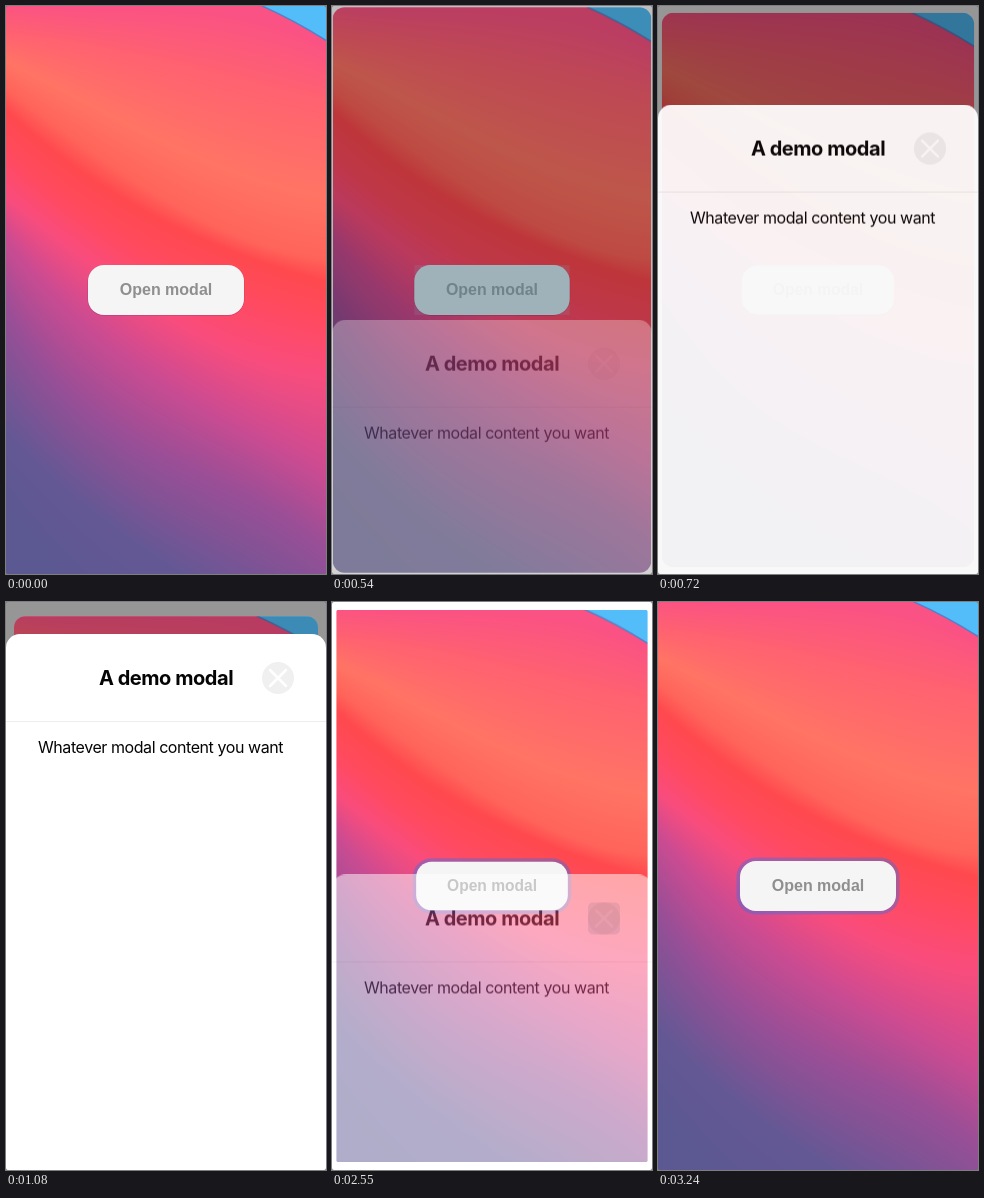
Write an HTML page with a canvas that moves like this. It is 320 px wide and 568 px high and loops after 3.54 s.

```html
<!DOCTYPE html>
<html lang="en">
<head>
<meta charset="utf-8">
<title>Modal demo</title>
<style>
  html, body { margin: 0; width: 100%; height: 100%; overflow: hidden; background: #777; }
  canvas { display: block; width: 320px; height: 568px; border-radius: 2px; }
</style>
</head>
<body>
<canvas id="stage"></canvas>
<script>
const W = 320, H = 568, LOOP = 3540, STEP = 30;
const dpr = window.devicePixelRatio || 1;

function sizeCanvas(canvas, w, h) {
  canvas.width = Math.round(w * dpr);
  canvas.height = Math.round(h * dpr);
  const c = canvas.getContext('2d');
  c.scale(dpr, dpr);
  return c;
}

const clamp = v => Math.min(1, Math.max(0, v));
const span = (t, from, to) => clamp((t - from) / (to - from));
const smooth = x => x * x * (3 - 2 * x);
const inOutCubic = x => x < 0.5 ? 4 * x ** 3 : 1 - 4 * (1 - x) ** 3;
const mix = (a, b, k) => a + (b - a) * k;

function roundRect(c, x, y, w, h, r) {
  c.beginPath();
  c.roundRect(x, y, w, h, r);
}

// Colour bands: heights at four evenly spaced columns, then the colour.
const BANDS = [
  [[-5, 0, 5, 38], [250, 82, 132]],
  [[28, 45, 70, 95], [255, 98, 112]],
  [[55, 110, 160, 190], [255, 116, 100]],
  [[82, 160, 222, 252], [255, 100, 90]],
  [[104, 186, 240, 275], [255, 73, 78]],
  [[150, 232, 285, 318], [255, 74, 97]],
  [[188, 270, 335, 365], [250, 76, 124]],
  [[228, 335, 405, 465], [205, 75, 145]],
  [[300, 418, 475, 540], [155, 78, 150]],
  [[425, 520, 590, 660], [100, 88, 148]],
  [[500, 620, 700, 760], [92, 88, 145]]
];

// Cubic through four heights.
function curveAt([a, b, c, d], x) {
  const u = x / W * 3;
  return -a * (u - 1) * (u - 2) * (u - 3) / 6
    + b * u * (u - 2) * (u - 3) / 2
    - c * u * (u - 1) * (u - 3) / 2
    + d * u * (u - 1) * (u - 2) / 6;
}

function makeWallpaper() {
  const canvas = document.createElement('canvas');
  canvas.width = W;
  canvas.height = H;
  const c = canvas.getContext('2d');
  const img = c.createImageData(W, H);
  for (let x = 0; x < W; x++) {
    const ys = BANDS.map(b => curveAt(b[0], x));
    let i = 0;
    for (let y = 0; y < H; y++) {
      while (i < BANDS.length - 2 && y > ys[i + 1]) i++;
      const k = span(y, ys[i], ys[i + 1]);
      const p = (y * W + x) * 4;
      for (let n = 0; n < 3; n++) {
        img.data[p + n] = mix(BANDS[i][1][n], BANDS[i + 1][1][n], k);
      }
      img.data[p + 3] = 255;
    }
  }
  c.putImageData(img, 0, 0);

  c.beginPath();
  c.moveTo(254, -1);
  c.quadraticCurveTo(288, 14, 321, 35);
  c.lineTo(321, -1);
  c.closePath();
  c.fillStyle = '#52bdf8';
  c.fill();
  c.beginPath();
  c.moveTo(254, -1);
  c.quadraticCurveTo(288, 14, 321, 35);
  c.strokeStyle = 'rgba(60,130,205,.8)';
  c.lineWidth = 1.5;
  c.stroke();
  return canvas;
}

function makeModal() {
  const canvas = document.createElement('canvas');
  const c = sizeCanvas(canvas, W, H);
  roundRect(c, 0, 0, W, H + 20, 14);
  c.fillStyle = '#fff';
  c.fill();

  c.fillStyle = '#ededed';
  c.fillRect(0, 87, W, 1);

  c.fillStyle = '#050505';
  c.textBaseline = 'alphabetic';
  c.font = '700 20px Inter, sans-serif';
  c.letterSpacing = '-0.45px';
  c.textAlign = 'center';
  c.fillText('A demo modal', 160, 51);
  c.font = '400 16px Inter, sans-serif';
  c.letterSpacing = '-0.43px';
  c.textAlign = 'left';
  c.fillText('Whatever modal content you want', 32, 119);

  c.beginPath();
  c.arc(272, 44, 16, 0, Math.PI * 2);
  c.fillStyle = '#f0f0f0';
  c.fill();
  c.beginPath();
  c.moveTo(264, 36);
  c.lineTo(280, 52);
  c.moveTo(280, 36);
  c.lineTo(264, 52);
  c.strokeStyle = '#fff';
  c.lineWidth = 2.5;
  c.lineCap = 'round';
  c.stroke();
  return canvas;
}

const ctx = sizeCanvas(document.getElementById('stage'), W, H);
const wallpaper = makeWallpaper();
let modal = makeModal();

function pose(t) {
  if (t < 2333) {
    return {
      rise: inOutCubic(span(t, 85, 1011)),
      alpha: smooth(span(t, 400, 780)),
      shrink: smooth(span(t, 430, 1030)),
      shade: 0.41 * smooth(span(t, 415, 630)),
      radius: 12 * smooth(span(t, 60, 470)),
      tap: span(t, 0, 90) * (1 - span(t, 500, 600)),
      ring: false,
      closeTap: 0
    };
  }
  const left = 1 - inOutCubic(span(t, 2333, 2783));
  return {
    rise: left,
    alpha: left * 0.85 + left * left * 0.15,
    shrink: left,
    shade: 0.41 * (1 - smooth(span(t, 2340, 2490))),
    radius: 12 * left ** 3,
    tap: 0,
    ring: true,
    closeTap: span(t, 2340, 2400) * 0.3
  };
}

function drawButton(s) {
  if (s.ring) {
    roundRect(ctx, 78.5, 255.5, 163, 57, 19.5);
    ctx.fillStyle = 'rgba(70,110,220,.45)';
    ctx.fill();
  } else {
    roundRect(ctx, 81.5, 259, 157, 50.8, 16.5);
    ctx.fillStyle = 'rgba(110,40,90,.3)';
    ctx.fill();
  }
  roundRect(ctx, 82, 259, 156, 50, 16);
  ctx.fillStyle = '#f5f5f5';
  ctx.fill();
  ctx.fillStyle = '#8f8f8f';
  ctx.font = '700 16px "Liberation Sans", Arial, sans-serif';
  ctx.textAlign = 'center';
  ctx.fillText('Open modal', 160, 289);
  if (s.tap > 0) {
    ctx.fillStyle = `rgba(160,225,255,${0.25 * s.tap})`;
    ctx.fillRect(82, 259, 156, 50);
    roundRect(ctx, 82, 259, 156, 50, 16);
    ctx.fillStyle = `rgba(160,225,255,${0.45 * s.tap})`;
    ctx.fill();
  }
}

function drawPage(s) {
  const k = 1 - 0.05 * s.shrink;
  ctx.save();
  ctx.translate(W / 2, H / 2);
  ctx.scale(k, k);
  ctx.translate(-W / 2, -H / 2);
  roundRect(ctx, 0, 0, W, H, s.radius);
  ctx.clip();
  ctx.drawImage(wallpaper, 0, 0, W, H);
  drawButton(s);
  // The shade softens a little as the page settles back.
  ctx.fillStyle = `rgba(0,0,0,${s.shade * (1 - 0.35 * s.shrink ** 2)})`;
  ctx.fillRect(0, 0, W, H);
  ctx.restore();
}

function drawModal(s) {
  if (s.alpha <= 0) return;
  const y = mix(H, 32, s.rise);
  ctx.save();
  ctx.globalAlpha = s.alpha;
  ctx.drawImage(modal, 0, y, W, H);
  if (s.closeTap > 0) {
    roundRect(ctx, 256, y + 28, 32, 32, 5);
    ctx.fillStyle = `rgba(110,100,120,${s.closeTap})`;
    ctx.fill();
  }
  ctx.restore();
}

function draw(t) {
  const s = pose(t);
  const grey = Math.round(255 * (1 - s.shade));
  ctx.fillStyle = `rgb(${grey},${grey},${grey})`;
  ctx.fillRect(0, 0, W, H);
  drawPage(s);
  drawModal(s);
}

const start = performance.now();
function tick() {
  const t = (performance.now() - start) % LOOP;
  draw(Math.floor(t / STEP) * STEP);
  requestAnimationFrame(tick);
}
tick();
</script>
</body>
</html>
```
